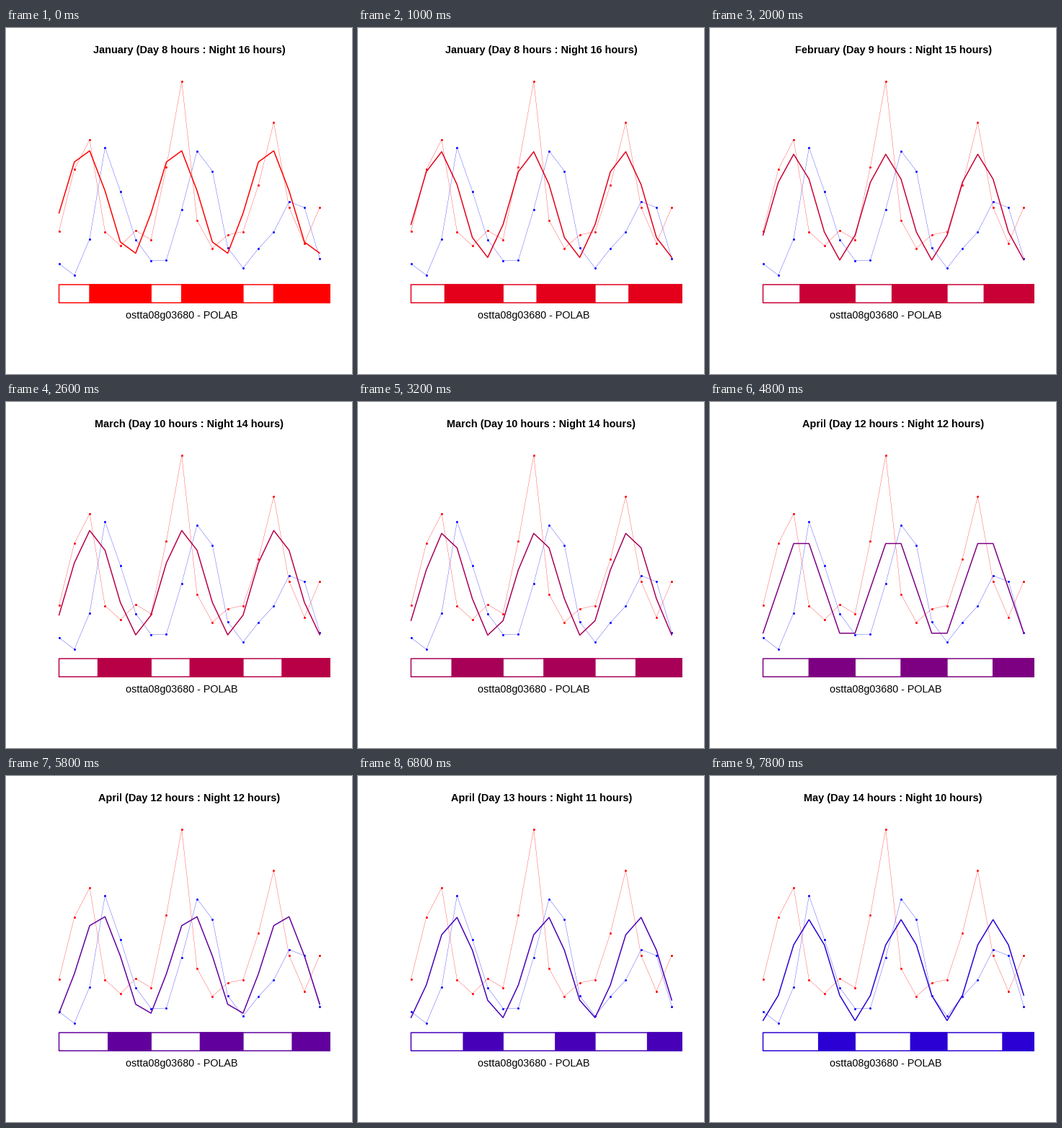
Write a matplotlib script that moves like this. It is 480 by 480 pixels and loops after 8000 ms.

```python
import numpy as np
import matplotlib.pyplot as plt
from matplotlib.animation import FuncAnimation
from matplotlib.patches import Rectangle

SIZE, DPI = 480, 72          # at 72 dpi one point is one pixel
FRAMES, INTERVAL = 40, 200
LEFT, HOUR = 73.51, 5.3203   # x of hour zero, pixels per hour
BAR_TOP, BAR_BOTTOM = 356, 381.2
MONTHS = ["January", "February", "March", "March", "April", "April", "May"]

RED = [282, 196, 155, 282.5, 302, 281, 293.5, 192.5, 74,
       267, 305.5, 287, 282.5, 218, 131, 249, 298.5, 248.5]
BLUE = [327, 343, 292.5, 166, 226.5, 293.5, 322.5, 322, 251.5,
        170.5, 198.5, 305, 333, 306, 283, 241, 249, 319.5]

hours = np.arange(0, 72, 4)
xs = LEFT + HOUR * hours

plt.rcParams["font.family"] = "Liberation Sans"
fig = plt.figure(figsize=(SIZE / DPI, SIZE / DPI), dpi=DPI, facecolor="white")
ax = fig.add_axes([0, 0, 1, 1])
ax.set_xlim(0, SIZE)
ax.set_ylim(SIZE, 0)
ax.axis("off")

region = Rectangle((59.04, 59.04), 390.72, 347.52, transform=ax.transData)


def add_series(ys, color):
    ax.plot(xs, ys, color=color, lw=0.3, zorder=1)
    dots, = ax.plot(xs, ys, "o", color=color, ms=3, mew=0, zorder=2)
    dots.set_snap(False)


def add_bar(start, length, filled):
    bar = Rectangle((LEFT + HOUR * start, BAR_TOP), HOUR * length,
                    BAR_BOTTOM - BAR_TOP, fill=filled, lw=1.5,
                    joinstyle="round", zorder=3)
    bar.set_snap(False)
    ax.add_patch(bar)
    bar.set_clip_path(region)
    return bar


add_series(BLUE, "blue")
add_series(RED, "red")
outline = add_bar(0, 72, False)
nights = [add_bar(24 * d + 8, 16, True) for d in range(3)]
wave, = ax.plot(xs, xs, lw=1.5, solid_capstyle="round",
                solid_joinstyle="round", zorder=4)
title = ax.text(254.2, 35, "", size=14.56, weight="bold", ha="center",
                va="baseline")
ax.text(LEFT + HOUR * 32, 403, "ostta08g03680 - POLAB", size=14.4,
        ha="center", va="baseline")


def update(i):
    mix = i / 47
    color = (1 - mix, 0, mix)

    # The fitted daily rhythm drifts later, lower and slightly flatter.
    angle = 2 * np.pi * hours / 24 - np.radians(102 + 2 * i)
    wave.set_ydata(241.4 + 0.715 * i - (74.7 - 0.12 * i) * np.cos(angle))
    wave.set_color(color)

    day = 8 + i / 6
    outline.set_edgecolor(color)
    for d, night in enumerate(nights):
        night.set_x(LEFT + HOUR * (24 * d + day))
        night.set_width(HOUR * (24 - day))
        night.set_color(color)

    step = i // 6
    title.set_text(f"{MONTHS[step]} (Day {8 + step} hours : "
                   f"Night {16 - step} hours)")
    return [wave, outline, title, *nights]


anim = FuncAnimation(fig, update, frames=FRAMES, interval=INTERVAL,
                     init_func=lambda: update(0), repeat=True,
                     repeat_delay=0, blit=False)
plt.show()
```
